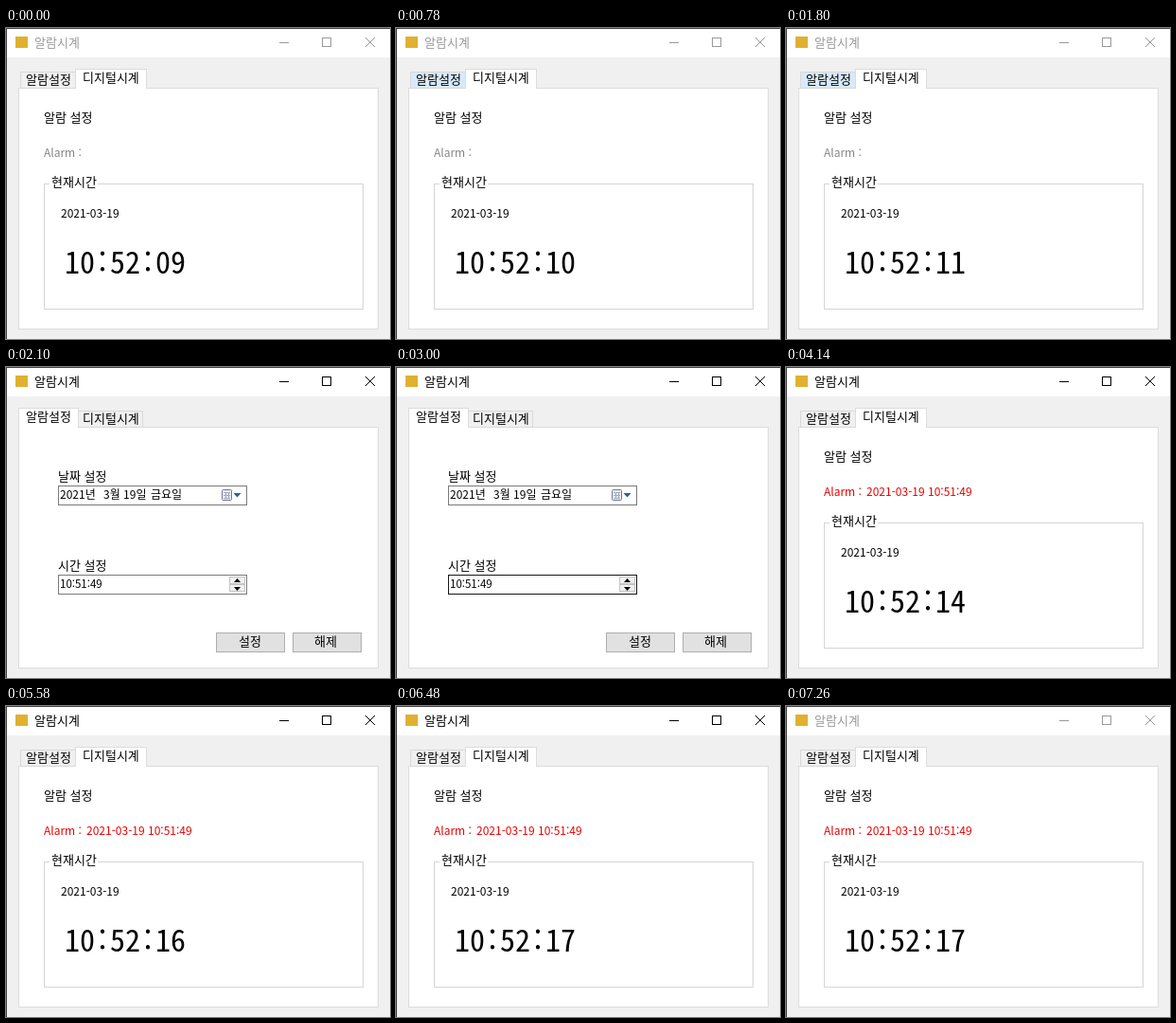
An HTML page that plays this animation: 406x328 px, repeating every 7380 ms.

```html
<!DOCTYPE html>
<html lang="ko">
<head>
<meta charset="utf-8">
<title>알람시계</title>
<style>
  html, body { margin: 0; width: 100%; height: 100%; overflow: hidden; background: #f0f0f0; }
  svg { display: block; width: 406px; height: 328px; }
  text { font: 13px "Noto Sans CJK KR", "Noto Sans CJK", sans-serif; white-space: pre; }
  .small { font-size: 12px; }
  .time { font-size: 11.5px; }
  .big { font: 32px "Noto Sans Mono CJK KR", "Noto Sans Mono", monospace; }
  .shape { shape-rendering: crispEdges; }
  .tab { fill: #f0f0f0; stroke: #d9d9d9; }
  .page { fill: #fff; stroke: #dcdcdc; }
  .field { fill: #fff; stroke: #7a7a7a; }
  .button { fill: #e1e1e1; stroke: #adadad; }
  .spin { fill: #f0f0f0; stroke: #c4c4c4; }

  /* One 7380 ms loop, every change is hard */
  .title, .clock, .setup, .hot, .seconds, .alarm, .stamp, .picker, .set {
    animation: 7380ms step-end infinite;
  }
  .title { animation-name: title; }
  .clock { animation-name: clock; }
  .setup { animation-name: setup; }
  .hot { animation-name: hot; }
  .seconds { animation-name: seconds; }
  .alarm { animation-name: alarm; }
  .stamp { animation-name: stamp; }
  .picker { animation-name: picker; }
  .set { animation-name: set; }

  @keyframes title {
    0%, 98.373% { color: #999; }
    26.829% { color: #000; }
  }
  @keyframes clock {
    0%, 55.284% { opacity: 1; }
    27.642% { opacity: 0; }
  }
  @keyframes setup {
    0%, 55.284% { opacity: 0; }
    27.642% { opacity: 1; }
  }
  @keyframes hot {
    0%, 11.382%, 27.642% { fill: #f0f0f0; }
    10.569%, 24.39% { fill: #d8eaf9; }
  }
  @keyframes seconds {
    0% { transform: translateY(0); }
    2.439% { transform: translateY(-40px); }
    14.634% { transform: translateY(-80px); }
    55.284% { transform: translateY(-120px); }
    63.414% { transform: translateY(-160px); }
    75.609% { transform: translateY(-200px); }
    87.804% { transform: translateY(-240px); }
  }
  @keyframes alarm {
    0% { fill: #858585; }
    55.284% { fill: #e60000; }
  }
  @keyframes stamp {
    0% { opacity: 0; }
    55.284% { opacity: 1; }
  }
  @keyframes picker {
    0%, 46.341% { stroke: #7a7a7a; }
    40.65% { stroke: #171717; }
  }
  @keyframes set {
    0%, 55.284% { fill: #e1e1e1; stroke: #adadad; }
    49.593% { fill: #e5f1fb; stroke: #0078d7; }
    53.658% { fill: #cce4f7; stroke: #005499; }
  }
</style>
</head>
<body>
<svg viewBox="0 0 406 328">
  <defs>
    <clipPath id="face"><rect x="150" y="230" width="50" height="36"/></clipPath>
  </defs>

  <rect width="406" height="328" fill="#f0f0f0"/>
  <rect width="406" height="31" fill="#fff"/>
  <path class="shape" d="M0.5 328V0.5H406" fill="none" stroke="#444"/>
  <rect x="10" y="9" width="13" height="12" fill="#e0b030"/>
  <g class="title">
    <text x="30" y="19.5" fill="currentColor">알람시계</text>
    <g fill="none" stroke="currentColor">
      <path class="shape" d="M289 15.5h10M334.5 10.5h9v9h-9z"/>
      <path d="M380 10l10 10M390 10l-10 10"/>
    </g>
  </g>

  <rect class="page shape" x="13.5" y="63.5" width="380" height="254"/>

  <g class="clock">
    <rect class="tab hot shape" x="15.5" y="46.5" width="58" height="17"/>
    <path class="page shape" d="M73.5 64V43.5H148.5V64"/>
    <text x="21" y="59">알람설정</text>
    <text x="81" y="57">디지털시계</text>

    <text x="40" y="99">알람 설정</text>
    <text class="small alarm" x="40" y="135.5">Alarm :</text>
    <text class="small stamp" x="85" y="135.5" fill="#e60000">2021-03-19 10:51:49</text>

    <path class="shape" d="M46 164.5H40.5V296.5H377.5V164.5H97" fill="none" stroke="#d5d5d5"/>
    <text x="48" y="167">현재시간</text>
    <text class="small" x="58" y="199.5">2021-03-19</text>
    <text class="big" x="62" y="259">10:52:</text>
    <g clip-path="url(#face)">
      <g class="seconds">
        <text class="big" x="158" y="259">09</text>
        <text class="big" x="158" y="299">10</text>
        <text class="big" x="158" y="339">11</text>
        <text class="big" x="158" y="379">14</text>
        <text class="big" x="158" y="419">15</text>
        <text class="big" x="158" y="459">16</text>
        <text class="big" x="158" y="499">17</text>
      </g>
    </g>
  </g>

  <g class="setup">
    <rect class="tab shape" x="76.5" y="46.5" width="68" height="17"/>
    <path class="page shape" d="M13.5 64V43.5H76.5V64"/>
    <text x="21" y="57">알람설정</text>
    <text x="81" y="59">디지털시계</text>

    <text x="55" y="119.5">날짜 설정</text>
    <rect class="field shape" x="55.5" y="125.5" width="199" height="20"/>
    <text class="small" y="138.5"><tspan x="57">2021년</tspan><tspan x="103">3월 19일</tspan><tspan x="153">금요일</tspan></text>
    <rect x="228.5" y="129.5" width="10" height="11" rx="1" fill="#e8ebf2" stroke="#737b8c"/>
    <path class="shape" d="M230 132.5h7M230 135.5h7M230 138.5h7M232.5 132v7M235.5 132v7" stroke="#a5abba"/>
    <path d="M240.5 133h8l-4 4.5z" fill="#29648f"/>

    <text x="55" y="213.5">시간 설정</text>
    <rect class="field picker shape" x="55.5" y="219.5" width="199" height="20"/>
    <text class="time" x="57" y="232.5">10:51:49</text>
    <rect class="spin shape" x="236.5" y="221.5" width="16" height="7"/>
    <rect class="spin shape" x="236.5" y="229.5" width="16" height="7"/>
    <path d="M241 227h7l-3.5 -4zM241 232h7l-3.5 4z"/>

    <rect class="button set shape" x="222.5" y="280.5" width="72" height="20"/>
    <rect class="button shape" x="303.5" y="280.5" width="72" height="20"/>
    <text x="246" y="294">설정</text>
    <text x="326" y="294">해제</text>
  </g>
</svg>
</body>
</html>
```
